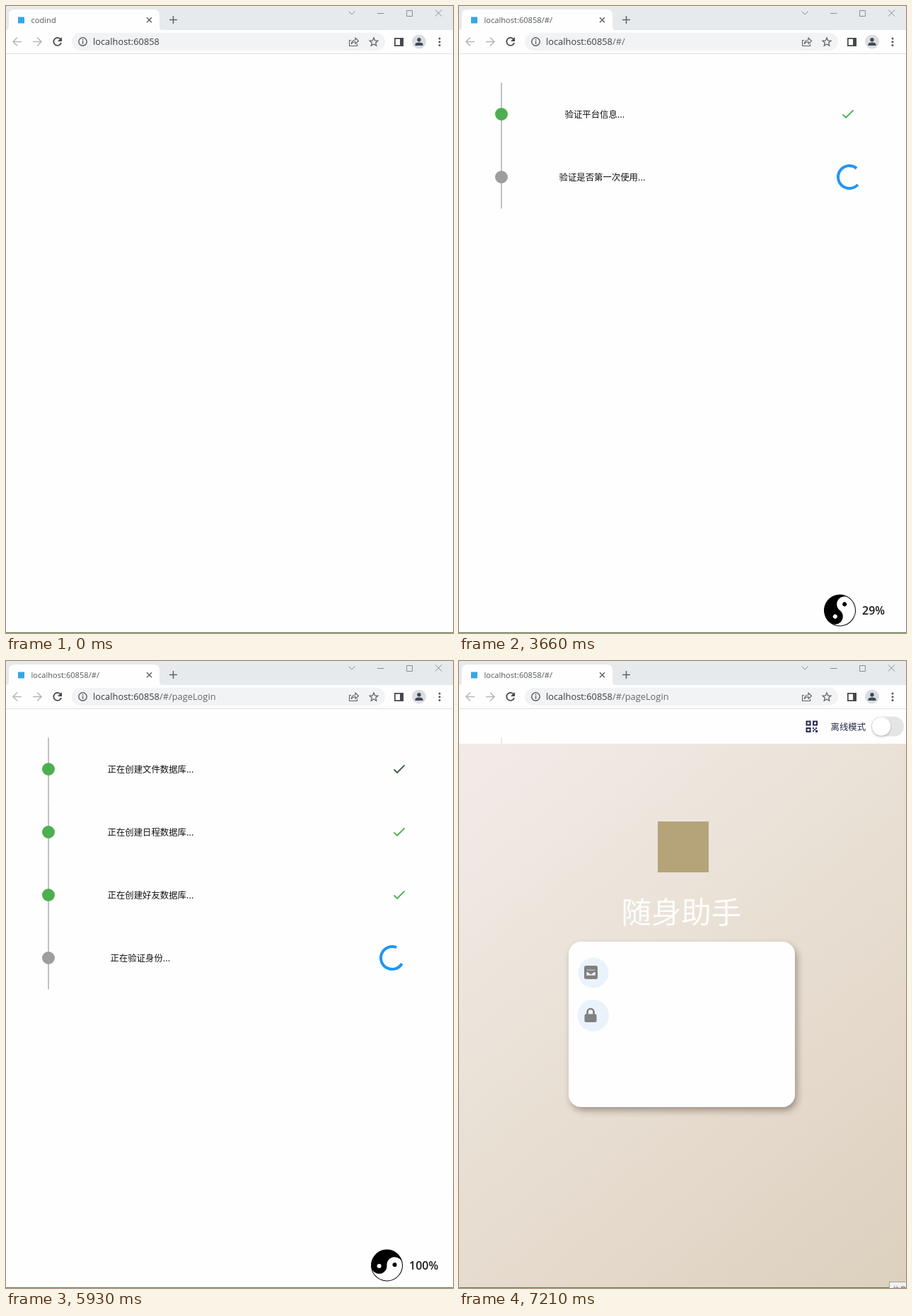
Recreate the animation shown at these times as an HTML page. Size 632 by 887 pixels, loop 7270 ms.

```html
<!DOCTYPE html>
<html lang="zh">
<head>
<meta charset="utf-8">
<title>codind</title>
<style>
html, body { margin: 0; width: 100%; height: 100%; overflow: hidden; background: #fefefe; }
svg { display: block; }
text { font-family: "Open Sans", "Noto Sans", sans-serif; }
.cjk { font-family: "Noto Sans CJK SC", "Noto Sans CJK", sans-serif; }
.line { fill: none; stroke: #5f6368; stroke-width: 1.5; }
.thin { fill: none; stroke: #8a8d90; stroke-width: 1; }
.step { font-size: 12.4px; font-weight: 500; fill: #111; }
</style>
</head>
<body>
<svg width="632" height="887" viewBox="0 0 632 887">
  <defs>
    <linearGradient id="sand" gradientUnits="userSpaceOnUse" x1="0" y1="117" x2="632" y2="886">
      <stop offset="0" stop-color="#f3ebe8"/>
      <stop offset=".35" stop-color="#ebe3d9"/>
      <stop offset=".68" stop-color="#e4d9cb"/>
      <stop offset="1" stop-color="#dcd1be"/>
    </linearGradient>
    <filter id="lift" x="-20%" y="-20%" width="140%" height="150%">
      <feDropShadow dx="3" dy="5" stdDeviation="5" flood-color="#3a3020" flood-opacity=".42"/>
    </filter>
    <filter id="soft" x="-30%" y="-30%" width="160%" height="170%">
      <feDropShadow dx="0" dy="1.5" stdDeviation="1.5" flood-opacity=".25"/>
    </filter>
  </defs>

  <rect width="632" height="887" fill="#fefefe"/>

  <!-- browser frame -->
  <rect width="632" height="34" fill="#e6eaed"/>
  <path d="M0 34q4 0 4-5V13q0-8 8-8h197q8 0 8 8v16q0 5 4 5z" fill="#fefefe"/>
  <rect x="17" y="15.5" width="9" height="9" fill="#36a6e6"/>
  <text id="title" x="35.5" y="24" font-size="11.1" fill="#55585c"></text>
  <path class="line" d="M199 16.2l7 7m0-7l-7 7M231 19.5h11m-5.500-5.500v11" stroke="#45484c"/>
  <path class="thin" d="M484.500 7.500l4.500 4.500 4.500-4.500M525 10.500h9.500M566.500 6.500h8v8h-8zM607 5.500l9 9m0-9l-9 9"/>
  <path class="line" d="M22 50.500H10.500m5.500-6l-6 6 6 6M38 50.500h11.500m-5.500-6l6 6-6 6" style="stroke:#b4b7ba"/>
  <path class="line" d="M77.200 47a5.500 5.500 0 1 0 .9 5" style="stroke:#45484c;stroke-width:1.800"/>
  <path d="M79 44v6h-6z" fill="#45484c"/>
  <rect x="93" y="38" width="443" height="25" rx="12.500" fill="#f1f3f4"/>
  <circle class="line" cx="108.500" cy="50.500" r="5.700"/>
  <path d="M107.800 49.500h1.500v4.200h-1.500zM107.800 47h1.500v1.500h-1.500z" fill="#5f6368"/>
  <text x="123" y="55" font-size="12.85" fill="#3a3c40">localhost:60858<tspan id="path" fill="#64686d"></tspan></text>
  <path class="line" d="M488 48.500h-2.500v8h11v-3M488 54q1-6 6-6v-3l4.500 4.500-4.500 4v-3q-3.500 0-6 3.500z" style="stroke-width:1.100"/>
  <path class="line" d="M520 45l1.700 3.900 4.200.4-3.200 2.800 1 4.100-3.700-2.200-3.700 2.200 1-4.100-3.200-2.800 4.200-.4z" style="stroke-width:1.300"/>
  <path d="M549 45h13v12h-13zm1.700 1.700v8.600h6.300v-8.600z" fill="#45484c" fill-rule="evenodd"/>
  <circle cx="584" cy="50.500" r="10" fill="#dadde1"/>
  <circle cx="584" cy="47.700" r="2.700" fill="#404a56"/>
  <path d="M578.500 56v-1.500q0-3 5.500-3t5.500 3V56z" fill="#404a56"/>
  <g fill="#55585c"><circle cx="613" cy="46" r="1.500"/><circle cx="613" cy="50.800" r="1.500"/><circle cx="613" cy="55.600" r="1.500"/></g>
  <rect y="67" width="632" height="1" fill="#dfe1e4"/>

  <!-- start-up steps -->
  <g id="setup">
    <g id="rows"></g>
    <path id="spin" fill="none" stroke="#2196f3" stroke-width="4"/>
    <g id="taiji">
      <circle r="22" fill="#fff" stroke="#000"/>
      <path d="M0-22A22 22 0 0 0 0 22A11 11 0 0 0 0 0A11 11 0 0 1 0-22z"/>
      <circle cy="-11" r="3"/>
      <circle cy="11" r="3" fill="#fff"/>
    </g>
    <text id="pct" x="570" y="861" font-size="16" font-weight="600" fill="#1c1c1c"></text>
  </g>

  <!-- login page -->
  <g id="login">
    <rect y="117" width="632" height="769" fill="url(#sand)"/>
    <rect x="59.500" y="108" width="1.500" height="9" fill="#e4e4e4"/>
    <path d="M491.500 85.500h5v5h-5zM501 85.500h5v5h-5zM491.500 95h5v5h-5z" fill="none" stroke="#262a52" stroke-width="2"/>
    <path d="M500 94h2v2h-2zM504 94h2v2h-2zM502 96h2v2h-2zM500 98h2v2h-2zM504 98h3v3h-3z" fill="#262a52"/>
    <text class="cjk" x="525.500" y="98" font-size="12.4" fill="#262a4c">离线模式</text>
    <rect x="583" y="78.500" width="46" height="28" rx="14" fill="#e5e5e5"/>
    <circle cx="597" cy="92.500" r="13" fill="#fff" filter="url(#soft)"/>
    <g id="head">
      <rect x="281" y="227" width="72" height="72" fill="#b3a074"/>
      <text class="cjk" x="229.500" y="371" font-size="42.4" font-weight="300" fill="#fff">随身助手</text>
    </g>
    <g id="card">
      <rect x="155" y="397" width="320" height="234" rx="18" fill="#fefefe" filter="url(#lift)"/>
      <g id="mail">
        <circle r="21.500" fill="#eaf3fb"/>
        <g transform="translate(-3.500 -.5)">
          <rect x="-9.500" y="-9.500" width="19" height="19" rx="2.500" fill="#808080"/>
          <path d="M-7-4.500h14v9.500h-14zM-7-3l7 5 7-5" fill="#eaf3fb" stroke="#808080" stroke-width="1.600"/>
        </g>
      </g>
      <g id="lock">
        <circle r="22.500" fill="#eaf3fb"/>
        <rect x="-12" y="-2" width="17" height="11.500" rx="2" fill="#808080"/>
        <path d="M-8-1v-4a4.500 4.500 0 0 1 9 0v4" fill="none" stroke="#808080" stroke-width="2.600"/>
      </g>
    </g>
  </g>

  <rect y="886" width="632" height="1" fill="#587a4c"/>
  <g id="tip">
    <rect x="608.500" y="878.500" width="40" height="20" fill="#f1f1f1" stroke="#a2a2a2"/>
    <text class="cjk" x="613" y="893" font-size="10" fill="#666">信息</text>
  </g>
  <path id="cursor" d="M.5.500V16l3.600-3.500 2.500 5.400 2.200-1-2.500-5.200h4.700z" fill="#fff" stroke="#111" stroke-linejoin="round"/>
</svg>
<script>
const LOOP = 7270, ROW = 89, TOP = 153;
const ITEMS = ['验证平台信息', '验证是否第一次使用', '正在创建知识数据库', '正在创建文件数据库',
  '正在创建日程数据库', '正在创建好友数据库', '正在验证身份'];
const SHOWN_AT = [2650, 3180, 3720, 4190, 4860, 5460, 5930];
const SPIN_FROM = [2550, 3085, 3625, 4100, 4765, 5405, 5405];
const HOLD = 65; // a fifth row shows briefly before the list is cut to four
const POINTER = [
  [240, 560, 857], [420, 420, 730], [560, 361, 650], [680, 378, 628], [780, 396, 620],
  [1179, 396, 620], [1180, 397, 619], [1510, 405, 611], [1650, 404.5, 612], [1710, 404, 612],
  [1860, 404, 612], [2580, 369, 580], [2780, 367, 578], [3320, -14, 640]
];

const $ = id => document.getElementById(id);
const clamp = x => Math.min(1, Math.max(0, x));
const span = (t, a, b) => clamp((t - a) / (b - a));
const easeOut = x => 1 - (1 - x) ** 3;
const backOut = x => 1 + 2.7 * (x - 1) ** 3 + 1.7 * (x - 1) ** 2;
const show = (id, on) => $(id).setAttribute('visibility', on ? 'visible' : 'hidden');
const move = (id, value) => $(id).setAttribute('transform', value);
const setText = (id, s) => { if ($(id).textContent !== s) $(id).textContent = s; };

// cubic-bezier(.4, 0, .2, 1)
function standard(x) {
  let lo = 0, hi = 1;
  for (let i = 0; i < 20; i++) {
    const s = (lo + hi) / 2, r = 1 - s;
    if (1.2 * r * r * s + 0.6 * r * s * s + s ** 3 < x) lo = s; else hi = s;
  }
  return 3 * (1 - lo) * lo * lo + lo ** 3;
}

function arc(cx, cy, from, sweep) {
  const at = a => `${cx + 16 * Math.cos(a)} ${cy + 16 * Math.sin(a)}`;
  return `M${at(from)}A16 16 0 ${sweep > Math.PI ? 1 : 0} 1 ${at(from + sweep)}`;
}

function spinner(cx, cy, u) {
  const cycle = u / 1333 % 1, turn = Math.PI * 2;
  const head = standard(clamp(cycle * 2)), tail = standard(clamp(cycle * 2 - 1));
  const from = turn * (-0.25 + tail * 0.75 + u / 2222 + cycle / 4);
  return arc(cx, cy, from, Math.max((head - tail) * 0.75 * turn, 0.001));
}

const isShort = i => ITEMS[i].length < 9;

function rowMarkup(i, slot, busy, dark) {
  const y = TOP + slot * ROW;
  const x = (isShort(i) ? 147.5 : 141.5) + (busy ? 0 : 2);
  const tick = busy ? '' : `<path transform="translate(${isShort(i) ? 550 : 556} ${y}) scale(.93) translate(-12.2 -12.3)"
    fill="${dark ? '#3d5c45' : '#4caf50'}" d="M9 16.170L4.830 12l-1.420 1.410L9 19 21 7l-1.410-1.410z"/>`;
  return `<rect x="59" y="${y - 44.5}" width="2" height="${ROW}" fill="#c2c2c2"/>
    <circle cx="60" cy="${y}" r="9" fill="${busy ? '#9e9e9e' : '#4caf50'}"/>
    <text class="cjk step" x="${x}" y="${y + 5}">${ITEMS[i]}...</text>${tick}`;
}

let rowKey = '';
function drawSetup(t) {
  const count = SHOWN_AT.filter(s => s <= t).length, last = count - 1;
  const held = (count === 5 || count === 6) && t - SHOWN_AT[last] < HOLD;
  const first = Math.max(0, count - (held ? 5 : 4));
  const key = count + ':' + first;
  if (key !== rowKey) {
    rowKey = key;
    let out = '';
    for (let i = first; i < count; i++) out += rowMarkup(i, i - first, i === last, count === 7 && i === first);
    $('rows').innerHTML = out;
  }
  // rendering stalls while the next page loads
  const live = t < 5600 ? t : t < 5930 ? 5600 : 5930;
  $('spin').setAttribute('d', count
    ? spinner(isShort(last) ? 546 : 552, TOP + (last - first) * ROW, live - SPIN_FROM[last]) : '');
  move('taiji', `translate(538.5 855) rotate(${19 + (live - 2780) * 0.0211})`);
  setText('pct', Math.ceil(count / 7 * 100) + '%');
}

function drawLogin(t) {
  const h = easeOut(span(t, 6690, 7120));
  move('head', `translate(0 ${-15 * (1 - h)})`);
  $('head').setAttribute('opacity', h * 0.95);
  const flip = t < 6730 ? 0 : Math.cos(Math.PI / 2 * (1 - backOut(span(t, 6660, 7080))));
  move('card', `translate(0 514) scale(1 ${Math.max(flip, 0.001)}) translate(0 -514)`);
  show('card', flip > 0.001);
  move('mail', `translate(190 441) scale(${easeOut(span(t, 7010, 7205))})`);
  move('lock', `translate(189.5 501.5) scale(${easeOut(span(t, 7030, 7210))})`);
}

function drawPointer(t) {
  const n = POINTER.findIndex(p => p[0] > t);
  show('cursor', n > 0);
  if (n < 1) return;
  const [a, b] = [POINTER[n - 1], POINTER[n]], k = span(t, a[0], b[0]);
  move('cursor', `translate(${a[1] + (b[1] - a[1]) * k} ${a[2] + (b[2] - a[2]) * k})`);
}

function draw(t) {
  const routed = t >= 1860, login = t >= 6200;
  setText('title', routed ? 'localhost:60858/#/' : 'codind');
  setText('path', t >= 5600 ? '/#/pageLogin' : routed ? '/#/' : '');
  $('setup').style.display = t >= 1990 && !login ? '' : 'none';
  $('login').style.display = login ? '' : 'none';
  if (login) drawLogin(t); else drawSetup(t);
  $('tip').setAttribute('opacity', t < 6400 ? 0 : 0.4 + 0.6 * span(t, 6400, 6540));
  drawPointer(t);
}

const start = performance.now();
function tick() {
  draw((performance.now() - start) % LOOP);
  requestAnimationFrame(tick);
}
tick();
</script>
</body>
</html>
```
